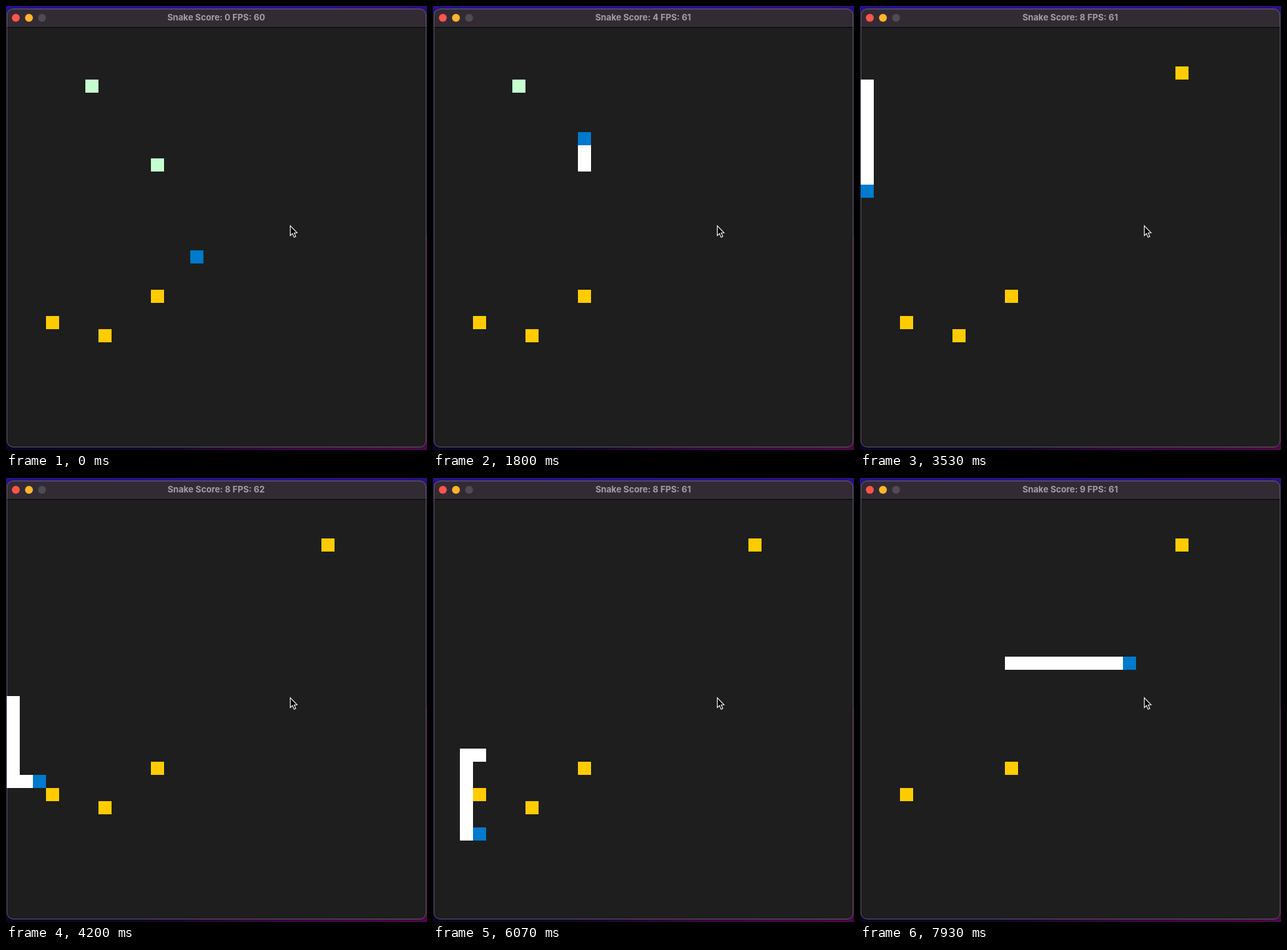
Animation of 642x676 px, one loop 8 s. Source, as an HTML page with a canvas:

```html
<!DOCTYPE html>
<html lang="en">
<head>
<meta charset="utf-8">
<title>Snake</title>
<style>
  html, body { margin: 0; width: 100%; height: 100%; overflow: hidden; background: #1e1e1e; }
  canvas { display: block; }
</style>
</head>
<body>
<canvas id="stage" width="642" height="676"></canvas>
<script>
const ctx = document.getElementById('stage').getContext('2d');
const W = 642, H = 676, CELL = 20, LEFT = 1, TOP = 32;
const LOOP = 8000, TICK = 1000 / 15;
const DIRS = { R: [1, 0], L: [-1, 0], U: [0, -1], D: [0, 1] };
const GREEN = '#c6ffcf', YELLOW = '#ffcc00', BLUE = '#007acc';

// Head positions, one per move.
const path = [[14, 17]];
for (const run of 'R4 U7 L7 U8 L1 D2 L10 D17 R12 U2 L10 D6 R5 U13 R13'.split(' ')) {
  const [dx, dy] = DIRS[run[0]];
  for (let i = +run.slice(1); i > 0; i--) {
    const [x, y] = path[path.length - 1];
    path.push([x + dx, y + dy]);
  }
}

const foods = [
  { x: 6, y: 4, color: GREEN, worth: 4, born: 0 },
  { x: 11, y: 10, color: GREEN, worth: 4, born: 0 },
  { x: 11, y: 20, color: YELLOW, worth: 1, born: 0 },
  { x: 3, y: 22, color: YELLOW, worth: 1, born: 0 },
  { x: 7, y: 23, color: YELLOW, worth: 1, born: 0 },
  { x: 24, y: 3, color: YELLOW, worth: 1, born: 3400 }
];
for (const f of foods) {
  const i = path.findIndex(([x, y]) => x === f.x && y === f.y);
  f.eaten = i < 0 ? Infinity : i;
}

// The snake speeds up as it eats: each pace holds from its step onwards.
const paces = [{ step: 0, ms: 93 }, { step: 18, ms: 64 }, { step: 93, ms: 61.5 }];
paces[0].start = -36;
for (let i = 1; i < paces.length; i++) {
  const prev = paces[i - 1];
  paces[i].start = prev.start + (paces[i].step - prev.step) * prev.ms;
}

function stepAt(t) {
  const pace = paces.findLast(p => t >= p.start);
  const step = pace.step + Math.floor((t - pace.start) / pace.ms);
  return Math.min(path.length - 1, step);
}

const scoreAt = step => foods.reduce((sum, f) => sum + (f.eaten <= step ? f.worth : 0), 0);

// Each food adds one segment per move until its worth is used up.
const lengthAt = step => 1 + foods.reduce(
  (sum, f) => sum + Math.max(0, Math.min(f.worth, step - f.eaten)), 0);

// The title refreshes about once a second.
function titleAt(t) {
  const k = Math.floor((t - 670) / 1030);
  const score = k < 0 ? 0 : scoreAt(stepAt(670 + 1030 * k));
  const fps = k < 1 ? 60 : k === 3 ? 62 : 61;
  return `Snake Score: ${score} FPS: ${fps}`;
}

function rect(x, y, w, h, color) {
  ctx.fillStyle = color;
  ctx.fillRect(x, y, w, h);
}

function cell(x, y, color) {
  rect(LEFT + x * CELL, TOP + y * CELL, CELL, CELL, color);
}

function blend(colors) {
  const g = ctx.createLinearGradient(0, 0, W, 0);
  colors.forEach((c, i) => g.addColorStop(i / (colors.length - 1), c));
  return g;
}

function drawWindow(t) {
  rect(0, 0, W, H, blend(['#0c0428', '#12052c', '#3c0644', '#4c0848']));
  rect(0, 0, W, 12, blend(['#27108a', '#2a1090', '#2c0e82']));
  rect(W - 1, 12, 1, H / 2, '#1c0a3c');

  ctx.save();
  ctx.beginPath();
  ctx.roundRect(1, 4, 640, 668, 10);
  ctx.clip();
  rect(0, 0, W, H, '#1e1e1e');
  rect(0, 4, W, 28, '#332b34');
  rect(0, 32, W, 1, '#050505');
  ctx.restore();

  ctx.beginPath();
  ctx.roundRect(1.5, 4.5, 639, 667, 9.5);
  ctx.lineWidth = 1;
  ctx.strokeStyle = 'rgba(255,255,255,0.27)';
  ctx.stroke();

  ['#ff5549', '#feb42b', '#504a52'].forEach((color, i) => {
    ctx.beginPath();
    ctx.arc(15 + 20 * i, 18, 6, 0, 2 * Math.PI);
    ctx.fillStyle = color;
    ctx.fill();
  });

  ctx.font = '700 13.15px Inter, sans-serif';
  ctx.textAlign = 'center';
  ctx.fillStyle = '#a39da6';
  ctx.fillText(titleAt(t), 320.5, 22);
}

function drawPointer() {
  const pts = [[0, 0], [0, 15], [3.4, 12], [5.8, 17.6], [8.4, 16.5], [6, 11], [10.4, 10.8]];
  ctx.beginPath();
  for (const [x, y] of pts) ctx.lineTo(433.5 + x, 334.5 + y);
  ctx.closePath();
  ctx.fillStyle = '#000';
  ctx.fill();
  ctx.lineWidth = 1.1;
  ctx.strokeStyle = '#fff';
  ctx.stroke();
}

function draw(time) {
  const t = Math.floor((time % LOOP + 4) / TICK) * TICK % LOOP;
  const step = stepAt(t);
  drawWindow(t);
  for (const f of foods) {
    if (t >= f.born && step < f.eaten) cell(f.x, f.y, f.color);
  }
  const tail = Math.max(0, step - lengthAt(step) + 1);
  for (let i = tail; i < step; i++) cell(...path[i], '#fff');
  cell(...path[step], BLUE);
  drawPointer();
}

const start = performance.now();
function loop() {
  draw(performance.now() - start);
  requestAnimationFrame(loop);
}
loop();
</script>
</body>
</html>
```
